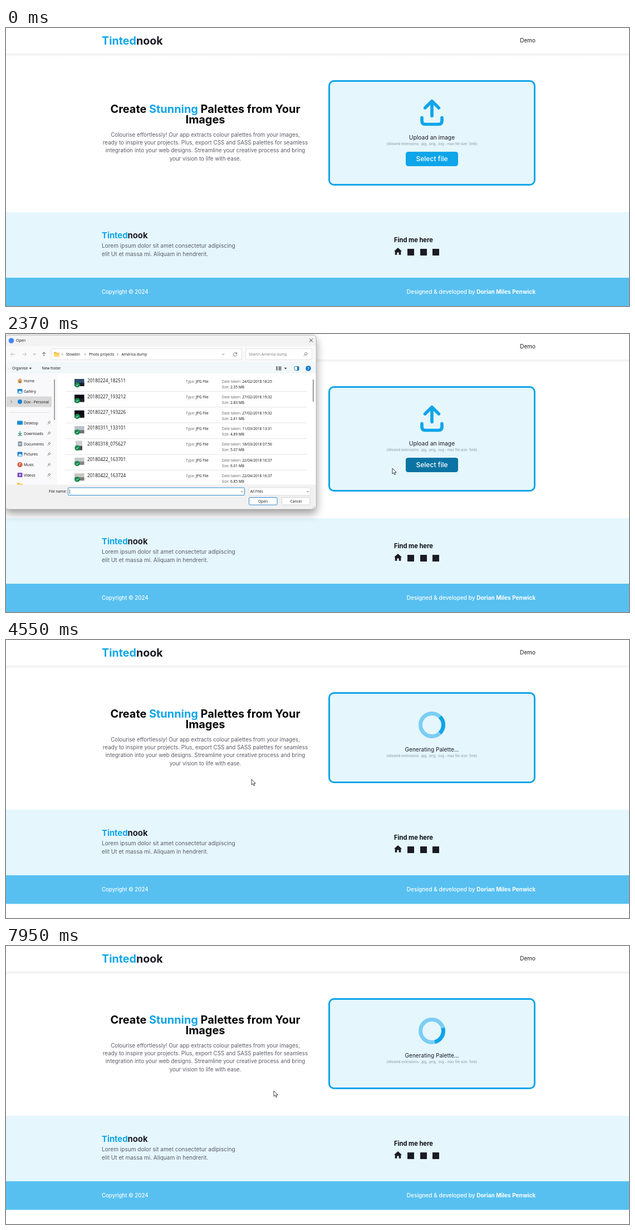
These frames come from a looping animation (1119 by 501 pixels, 8 s). An HTML page:

```html
<!DOCTYPE html>
<html lang="en">
<head>
<meta charset="utf-8">
<title>Palette upload demo</title>
<style>
html, body { margin: 0; width: 100%; height: 100%; overflow: hidden; background: #fff }
svg { display: block; width: 1119px; height: 501px; font-family: Inter, sans-serif }
#dialog { font-family: "Open Sans", sans-serif; transform-origin: 245px 138px; filter: drop-shadow(0 7px 8px #0006) }
</style>
</head>
<body>
<script>
const LOOP = 8000, SKY = '#0ea5e9', INK = '#1b1b26', ROW = 28.35;
const HEADINGS = 'font-weight="700"', MID = 'text-anchor="middle"', END = 'text-anchor="end"';

const text = (x, y, s, size, fill = INK, extra = '') =>
  `<text x="${x}" y="${y}" font-size="${size}" fill="${fill}" ${extra}>${s}</text>`;
const rect = (x, y, w, h, fill, extra = '') =>
  `<rect x="${x}" y="${y}" width="${w}" height="${h}" fill="${fill}" ${extra}/>`;
const line = (d, stroke = '#555', w = 0.8, extra = '') =>
  `<path d="${d}" fill="none" stroke="${stroke}" stroke-width="${w}" ${extra}/>`;
const shape = (d, fill) => `<path d="${d}" fill="${fill}"/>`;
const disc = (x, y, r, fill) => `<circle cx="${x}" cy="${y}" r="${r}" fill="${fill}"/>`;
const group = (id, body, extra = '') => `<g id="${id}" ${extra}>${body}</g>`;
const brand = (y, size) => text(172, y, `<tspan fill="${SKY}">Tinted</tspan>nook`, size, INK, HEADINGS);
const lines = (x, y, size, rows, extra) => rows.map((s, i) => text(x, y + i * 14.2, s, size, '#5b5d66', extra)).join('');
const folder = (x, y) => shape(`M${x - 5} ${y - 4}h4l1 1.5h5v6.5h-10z`, '#f5b83d') + rect(x - 5, y - 1.5, 10, 5.5, '#ffd568');

function page() {
  const header = rect(0, 46, 1119, 6, 'url(#shade)') + brand(29.5, 19.7) +
    text(951, 26.3, 'Demo', 9.95, INK, END);
  const hero = group('hero',
    text(358, 152.8, `Create <tspan fill="${SKY}">Stunning</tspan> Palettes from Your`, 19.9, '#050508', `${HEADINGS} ${MID}`) +
    text(358, 171.8, 'Images', 19.9, '#050508', `${HEADINGS} ${MID}`) +
    lines(358, 196, 9.8, ['Colourise effortlessly! Our app extracts colour palettes from your images,',
      'ready to inspire your projects. Plus, export CSS and SASS palettes for seamless',
      'integration into your web designs. Streamline your creative process and bring',
      'your vision to life with ease.'], MID));
  const round = 'stroke-linecap="round" stroke-linejoin="round"';
  const upload = group('upload',
    line('M765 158.3V132M752.7 144L765 131.7L777.3 144', SKY, 5.7, round) +
    line('M747 161.5v6q0 6 6 6h24q6 0 6-6v-6', SKY, 5.7, round) +
    text(765, 201, 'Upload an image', 10.35, INK, MID) +
    rect(718, 223, 94, 26, SKY, 'rx="4.5"') + rect(718, 223, 94, 26, '#0b73a3', 'rx="4.5" id="hover"') +
    text(765, 240.4, 'Select file', 12.1, '#fff', `font-weight="500" ${MID}`));
  const ring = 'cx="765" cy="153" r="20.5" fill="none" stroke-width="7"';
  const loading = group('loading',
    `<circle ${ring} stroke="#7bcdf3"/><circle id="arc" ${ring} stroke="${SKY}" pathLength="4" stroke-dasharray="1 3"/>` +
    text(765, 201, 'Generating Palette...', 10.1, INK, MID));
  const card = rect(580.5, 95.5, 369, 187, '#e5f6fd', `rx="8.5" stroke="${SKY}" stroke-width="3" id="card"`) + upload + loading +
    text(765, 211.3, '(Allowed extensions: .jpg, .png, .svg - max file size: 5mb)', 6.05, '#8a98a2', MID);
  const footer = group('footer',
    rect(0, 332, 1119, 118, '#e5f6fd') + rect(0, 450, 1119, 51.5, '#57c0f1') + brand(379, 14.8) +
    lines(172, 396.3, 10.05, ['Lorem ipsum dolor sit amet consectetur adipiscing', 'elit Ut et massa mi. Aliquam in hendrerit.']) +
    text(697, 385.5, 'Find me here', 11.1, '#0b0b12', HEADINGS) +
    shape('M704 396L711 402.3H709.3V408.7H705.7V404.5H702.3V408.7H698.7V402.3H697Z', INK) +
    [721, 744, 766].map(x => rect(x, 398, 12, 12, INK)).join('') +
    text(172, 478.8, 'Copyright © 2024', 9.65, '#fff', 'font-weight="500"') +
    text(951, 478.8, 'Designed &amp; developed by <tspan font-weight="700">Dorian Miles Penwick</tspan>', 10.1, '#fff', `font-weight="500" ${END}`));
  return header + hero + card + footer;
}

function fileRow([name, date, size], i) {
  const y = i * ROW, tall = i === 4;
  const [sky, land] = [['#2f4d6d', '#161c24'], ['#0c0d14', '#20222c'], ['#0a0b12', '#15161d'], ['#b9c3c9', '#6d7477'],
    ['#cdd0d2', '#4d4a4a'], ['#c6c9cb', '#8b837e'], ['#c9c5c2', '#7d7a76']][i];
  const [x, top, w, h] = tall ? [125, 79, 12, 17] : [123, 81, 17.5, 13];
  return line(`M106 ${103.5 + y}H541`, '#dedede') +
    rect(x, top + y, w, h, sky) + rect(x, top + y + h * 0.55, w, h * 0.45, land) +
    `<g class="badge">${disc(128, 91.8 + y, 4.7, '#0f8a4c')}${line(`M125.8 ${91.9 + y}l1.6 1.6l2.9-3.2`, '#fff', 1)}</g>` +
    text(146, 87.4 + y, name, 8.2, '#111') +
    text(323, 87.8 + y, 'Type: <tspan fill="#111">JPG File</tspan>', 6.6, '#666') +
    text(387.5, 87.8 + y, `Date taken: <tspan fill="#111">${date}</tspan>`, 6.6, '#666') +
    text(387.5, 98 + y, `Size: <tspan fill="#111">${size} MB</tspan>`, 6.6, '#666');
}

function sidebar() {
  const pin = y => line(`M74.5 ${y + 3}l2-2M75.3 ${y - 1.5}l3 3M76 ${y - 1}l2-2l2 2l-2 2z`, '#777', 0.9);
  const frame = (y, c) => rect(20.5, y - 4, 9, 8, c, 'rx="1"') + shape(`M21.5 ${y + 3}l3-4l2 2l1-1l1.5 3z`, '#fff');
  const items = [
    ['Home', 84, y => shape(`M20 ${y}l5-4.5l5 4.5h-1.3v4.3h-7.4V${y}z`, '#e0a86a') + rect(24, y + 1, 2.2, 3.3, '#7a5230')],
    ['Gallery', 103, y => frame(y, '#1b87d6')],
    ['Dov - Personal', 122, y => disc(25, y, 4, '#1683d8')],
    ['Desktop', 160, y => rect(20, y - 3.5, 10, 7, '#178fd1', 'rx="1"')],
    ['Downloads', 179, y => line(`M25 ${y - 4}v6m-3-2.6l3 3l3-3M21 ${y + 4}h8`, '#16836b', 1.1)],
    ['Documents', 198, y => rect(21.5, y - 4.5, 7.5, 9, '#8597a8', 'rx="1"') + line(`M23 ${y - 1}h4.5M23 ${y + 1}h4.5`, '#fff')],
    ['Pictures', 216.5, y => frame(y, '#1c7fd0')],
    ['Music', 235.5, y => disc(25, y, 4.6, '#d9593d') + line(`M24.3 ${y + 2}v-4.3l2.3 1`, '#fff', 1)],
    ['Videos', 254, y => rect(20.5, y - 4, 9, 8, '#7b4fc4', 'rx="1"') + shape(`M24 ${y - 2}l3.3 2l-3.3 2z`, '#fff')],
  ];
  return rect(0, 71, 92, 201, '#f9f9fb') + rect(1, 112.5, 81, 19, '#d9d9d9') + line('M8.5 119.8l2.2 2.2l-2.2 2.2') +
    items.map(([s, y, icon]) => icon(y) + text(32, y + 2.5, s, 6.7, '#111') + (y > 150 ? pin(y) : '')).join('') +
    line('M6 141.5H78', '#ddd') + folder(25, 272.5) + rect(86.3, 82, 1.5, 73, '#858585');
}

function dialog() {
  const files = [
    ['20180224_182511', '24/02/2018 18:25', '2.35'], ['20180227_193212', '27/02/2018 19:32', '2.83'],
    ['20180227_193226', '27/02/2018 19:32', '2.61'], ['20180311_133101', '11/03/2018 13:31', '4.89'],
    ['20180318_075627', '18/03/2018 07:56', '5.07'], ['20180422_163701', '22/04/2018 16:37', '6.01'],
    ['20180422_163724', '22/04/2018 16:37', '6.85']];
  const box = (x, y, w, h, c, fill = '#fff') => rect(x, y, w, h, fill, `rx="1.5" stroke="${c}" stroke-width=".9"`);
  const chevron = (x, y) => line(`M${x - 2} ${y - 1}l2 2l2-2`);
  const small = (x, y, s, extra) => text(x, y, s, 6.7, '#111', extra);
  const title = rect(-1, 2, 558, 314, '#f3f3f4', 'rx="5" stroke="#999" stroke-width=".7"') +
    disc(9.5, 12, 4.8, '#4285f4') + small(18, 14.2, 'Open') + line('M545 8.5l6 6m0-6l-6 6', '#222', 0.9);
  const address = rect(0, 22, 556.5, 28, '#fafafb') +
    line('M15.5 36.5h-7m3-3l-3 3l3 3M29.5 36.5h7m-3-3l3 3l-3 3', '#aaa') + chevron(51, 36.5) +
    line('M68 40v-7m-3 3l3-3l3 3', '#333') +
    box(81, 26.5, 342.5, 20, '#ddd') + folder(91, 36.5) +
    [101, 142, 200.5].map(x => line(`M${x - 1} 34.5l2 2l-2 2`)).join('') +
    small(108, 39, 'Stowbin') + small(149, 39, 'Photo projects') + small(207.5, 39, 'America dump') +
    chevron(390, 36.5) + line('M414.4 35.3a3.3 3.3 0 1 0 .3 2.4M414.7 33v2.6h-2.6') +
    box(430.5, 26.5, 119, 20, '#ddd') + text(436, 39, 'Search America dump', 6.7, '#777') +
    line('M535 39.5l2.3-2.3M541 35.7a2.2 2.2 0 1 1-4.4 0a2.2 2.2 0 1 1 4.4 0');
  const toolbar = rect(0, 50, 556.5, 22, '#f2f7f9') + small(11, 64.3, 'Organise') + shape('M41.5 60.8h4.6l-2.3 2.6z', '#333') +
    small(64.5, 64.3, 'New folder') + line('M485 59.5h3M485 62h3M485 64.5h3M489.5 59.5h5M489.5 62h5M489.5 64.5h5', '#444', 1.4) +
    shape('M499.8 60.8h4.6l-2.3 2.6z', '#333') + box(518, 58.5, 8, 7, '#1675b5') + rect(523, 58.5, 3, 7, '#1675b5') +
    disc(543, 62, 4.8, '#1179c9') + text(543, 64.5, '?', 6.8, '#fff', `${HEADINGS} ${MID}`);
  const list = rect(92, 71, 464.5, 201, '#fff') + rect(103, 0, 444, ROW, '#e5f3ff', 'id="row"') +
    files.map(fileRow).join('') + rect(551, 82, 1.6, 40, '#858585');
  const bottom = rect(0, 271.5, 556.5, 41, '#f1f1f2') + small(109, 286.2, 'File name:', END) +
    box(111.5, 277, 317, 13.5, '#1b7fc4') + group('picked', small(114, 286.4, files[2][0])) +
    line('M114.5 280v8', '#222', 0.7, 'id="caret"') + chevron(424, 284) +
    box(436, 277, 110.5, 13.5, '#ddd') + small(438.5, 286.2, 'All Files') + chevron(542, 284) +
    box(436.5, 294.5, 50.5, 13.5, '#1b7fc4') + small(461.5, 303.7, 'Open', MID) +
    box(495.5, 294.5, 50.5, 13.5, '#ccc') + small(520.8, 303.7, 'Cancel', MID) +
    line('M550 315l5-5M553 315l2-2', '#aaa');
  return group('dialog', title + address + toolbar + sidebar() + list + bottom);
}

const pointer = group('cursor',
  group('arrow', `<path d="M0 0V10L2.3 7.9L4 11.6L5.7 10.9L4.1 7.3H7.2Z" fill="#fff" stroke="#111" stroke-width=".8"/>`) +
  group('hand', `<path d="M-1 0Q0-1.2 1 0V4.2L5 5.2Q6.5 5.6 6.3 7L5.6 11H-.6L-4 6.8Q-3.4 5.2-1 7Z" fill="#fff" stroke="#111" stroke-width=".8"/>`));

document.body.innerHTML = `<svg viewBox="0 0 1119 501"><defs><linearGradient id="shade" x2="0" y2="1">
<stop stop-color="#efefef"/><stop offset="1" stop-color="#fff"/></linearGradient></defs>${page()}${dialog()}${pointer}</svg>`;

const $ = id => document.getElementById(id);
const badges = document.querySelectorAll('.badge');
const clamp = v => Math.max(0, Math.min(1, v));
const show = (el, on) => { el.style.display = on ? '' : 'none'; };

// time, x, y of the pointer tip
const PATH = [[120, 983, 407], [400, 850, 310], [670, 790, 267], [1130, 790, 267], [1400, 776, 240], [1880, 772, 238],
  [1950, 772, 238], [2170, 693.5, 238], [2370, 694, 242], [2600, 694, 242], [2710, 633, 232], [2840, 500, 172],
  [2980, 500, 172], [3380, 254, 157.5], [3500, 238, 152], [4410, 238, 152], [4550, 441, 251], [4760, 439, 259],
  [4900, 439, 259], [5240, 481, 261], [LOOP, 481, 261]];

function pointerAt(t) {
  const i = Math.max(1, PATH.findIndex(k => k[0] > t));
  const [t0, x0, y0] = PATH[i - 1], [t1, x1, y1] = PATH[i], p = clamp((t - t0) / (t1 - t0));
  return [x0 + (x1 - x0) * p, y0 + (y1 - y0) * p];
}

function draw(t) {
  const [x, y] = pointerAt(t), busy = t >= 3900, picked = t >= 3450;
  $('cursor').setAttribute('transform', `translate(${x} ${y})`);
  show($('cursor'), t >= 120);
  const onButton = !busy && x > 718 && x < 812 && y > 223 && y < 249;
  show($('hand'), onButton);
  show($('arrow'), !onButton);

  $('hero').setAttribute('transform', `translate(0 ${busy ? -13 : 0})`);
  $('footer').setAttribute('transform', `translate(0 ${busy ? -26 : 0})`);
  $('card').setAttribute('height', busy ? 161 : 187);
  show($('upload'), !busy);
  show($('loading'), busy);
  $('hover').setAttribute('opacity', clamp((t - 1310) / 200));
  $('arc').setAttribute('transform', `rotate(${(t - 4550) * 0.1146 - 45} 765 153)`);

  const opening = 1 - (1 - clamp((t - 2090) / 240)) ** 3, closing = clamp((t - 3660) / 180);
  const visible = opening > 0 && closing < 1;
  show($('dialog'), visible);
  if (!visible) return;
  $('dialog').style.opacity = clamp(opening * 1.15) * (1 - closing);
  $('dialog').style.transform = `scale(${0.81 + 0.19 * opening - 0.08 * closing})`;
  badges.forEach(b => show(b, t >= 2240));
  const row = Math.floor((y - 75.5) / ROW);
  show($('row'), x > 103 && x < 547 && t > 2710);
  $('row').setAttribute('y', 75.5 + row * ROW);
  $('row').setAttribute('fill', picked ? '#cce8ff' : '#e5f3ff');
  show($('picked'), picked);
  show($('caret'), !picked);
}

(function tick() {
  draw(performance.now() % LOOP);
  requestAnimationFrame(tick);
})();
</script>
</body>
</html>
```
